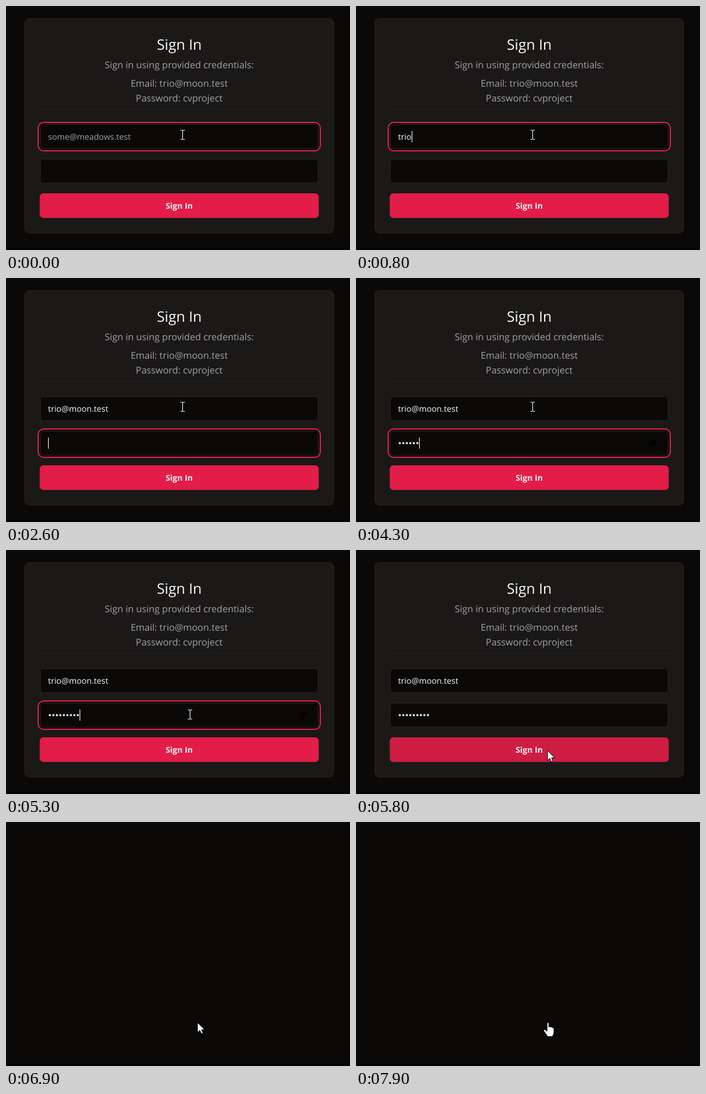
Animation of 556x396 px, one loop 8000 ms. Source, as an HTML page:

```html
<!DOCTYPE html>
<html lang="en">
<head>
<meta charset="utf-8">
<title>Sign In</title>
<style>
  html, body { margin: 0; width: 100%; height: 100%; overflow: hidden; background: #0a0908; }
  svg { display: block; font: 450 15.2px "Open Sans", "Noto Sans", sans-serif; text-rendering: geometricPrecision; }
  .center { text-anchor: middle; }
  .muted { fill: #a1a1aa; }
  .field { fill: #0a0908; stroke: #262524; }
  .small { font-size: 13.4px; }
  .light { fill: #fafafa; font-weight: 500; }
  .label { font-size: 13.2px; font-weight: 700; fill: #fff1f2; }
</style>
</head>
<body>
<svg width="556" height="396" viewBox="0 0 556 396">
  <rect width="556" height="396" fill="#0a0908"/>
  <rect y="392" width="556" height="4" fill="#070304"/>
  <g id="card">
    <rect x="30.5" y="20.5" width="499" height="348" rx="7.5" fill="#1b1917" stroke="#262524"/>
    <g class="center muted">
      <text x="280" y="71" class="light" font-size="23.3">Sign In</text>
      <text x="280" y="101">Sign in using provided credentials:</text>
      <text x="280" y="131">Email: trio@moon.test</text>
      <text x="280" y="155">Password: cvproject</text>
    </g>
    <path d="M55 167.5H505" stroke="#262524"/>
    <rect id="ring" x="52" width="456" height="46" rx="9" fill="#0a0908" stroke="#e11d48" stroke-width="2"/>
    <rect class="field" x="55.5" y="192.5" width="449" height="39" rx="5.5"/>
    <rect class="field" x="55.5" y="248.5" width="449" height="39" rx="5.5"/>
    <text id="email" class="small" x="68" y="217"></text>
    <g id="dots" class="light"></g>
    <g id="eye" fill="none" stroke="#000" stroke-width="1.3">
      <path d="M473.5 269Q480 258 486.5 269M475 274.5L485.5 262"/>
      <circle cx="480" cy="269.5" r="3"/>
    </g>
    <rect id="caret" width="1" height="18" fill="#fff"/>
    <g id="button">
      <rect id="face" x="54.5" y="304" width="451" height="40" rx="6"/>
      <text id="label" class="center label" x="280" y="329"></text>
    </g>
  </g>
  <path id="ibeam" fill="none" stroke="#fff"
    d="M-3 -7.5H-1Q.5 -7.5 .5 -6V6Q.5 7.5 -1 7.5H-3M4 -7.5H2Q.5 -7.5 .5 -6V6Q.5 7.5 2 7.5H4"/>
  <path id="arrow" d="M.5 .5V16.5L4.2 13L6.8 18.8L9.4 17.6L6.9 12H12Z" fill="#fff" stroke="#000" stroke-width=".9"/>
  <path id="hand" fill="#fff" stroke="#000" stroke-width=".7"
    d="M0 2Q0 .5 1.3 .5T2.7 2V8Q3 6.8 4.2 7T5.3 8.2Q6 7.3 7 7.6T8.1 9Q9 8.4 9.9 8.9T10.9 11V15.5Q10.8 19 8.5 23H.5Q-1 20 -3 17.5L-5.5 14Q-6 12.5 -4.6 12.1T-2 13L0 15Z"/>
</svg>
<script>
const LOOP = 8000;
const EMAIL = "trio@moon.test";
const emailKeys = [100, 300, 700, 800, 1100, 1400, 1500, 1700, 1700, 1900, 2000, 2100, 2200, 2300];
const passwordKeys = [3000, 3300, 3700, 3900, 4100, 4300, 4400, 4500, 4800];
const DOT = 5.67;

const $ = id => document.getElementById(id);
const show = (id, on) => $(id).style.display = on ? "" : "none";
const pressed = (keys, t) => keys.filter(k => k <= t).length;
const mix = (a, b, p) => a + (b - a) * p;

$("dots").innerHTML = passwordKeys.map((_, i) =>
  `<circle cx="${68 + (i + 0.5) * DOT}" cy="268" r="1.8"/>`).join("");

function drawFields(t) {
  const typed = pressed(emailKeys, t), hidden = pressed(passwordKeys, t);
  const onPassword = t >= 2600, focused = t < 5700;
  const email = $("email");

  email.textContent = typed ? EMAIL.slice(0, typed) : "some@meadows.test";
  email.setAttribute("class", typed ? "small light" : "small muted");
  [...$("dots").children].forEach((dot, i) => dot.style.display = i < hidden ? "" : "none");

  show("ring", focused);
  $("ring").setAttribute("y", onPassword ? 245 : 189);
  show("caret", focused && typed);
  const textWidth = onPassword ? hidden * DOT : email.getComputedTextLength();
  $("caret").setAttribute("x", Math.round(68 + textWidth));
  $("caret").setAttribute("y", onPassword ? 259 : 203);
  show("eye", focused && hidden > 3);
}

function drawButton(t) {
  const loading = t >= 5900;
  const hovered = t >= 5500 && !loading;
  $("label").textContent = loading ? "Loading..." : "Sign In";
  $("face").setAttribute("fill", hovered ? "#cd1d43" : "#e11d48");
  $("button").setAttribute("opacity", loading ? 0.5 : 1);
}

function drawPointer(t) {
  const s = Math.min(1, Math.max(0, Math.floor((t - 5100) / 100) / 4));
  const p = s * s * (3 - 2 * s);
  const x = Math.round(mix(285, 309, p)), y = Math.round(mix(209, 325, p));
  const overField = y < 232 || (y >= 248 && y < 288);
  const shape = t >= 7900 ? "hand" : overField ? "ibeam" : "arrow";
  for (const id of ["ibeam", "arrow", "hand"]) {
    show(id, id === shape);
    $(id).setAttribute("transform", `translate(${x} ${y})`);
  }
}

function frame(now) {
  const t = now % LOOP;
  show("card", t < 6900);
  drawFields(t);
  drawButton(t);
  drawPointer(t);
  requestAnimationFrame(frame);
}
frame(0);
</script>
</body>
</html>
```
